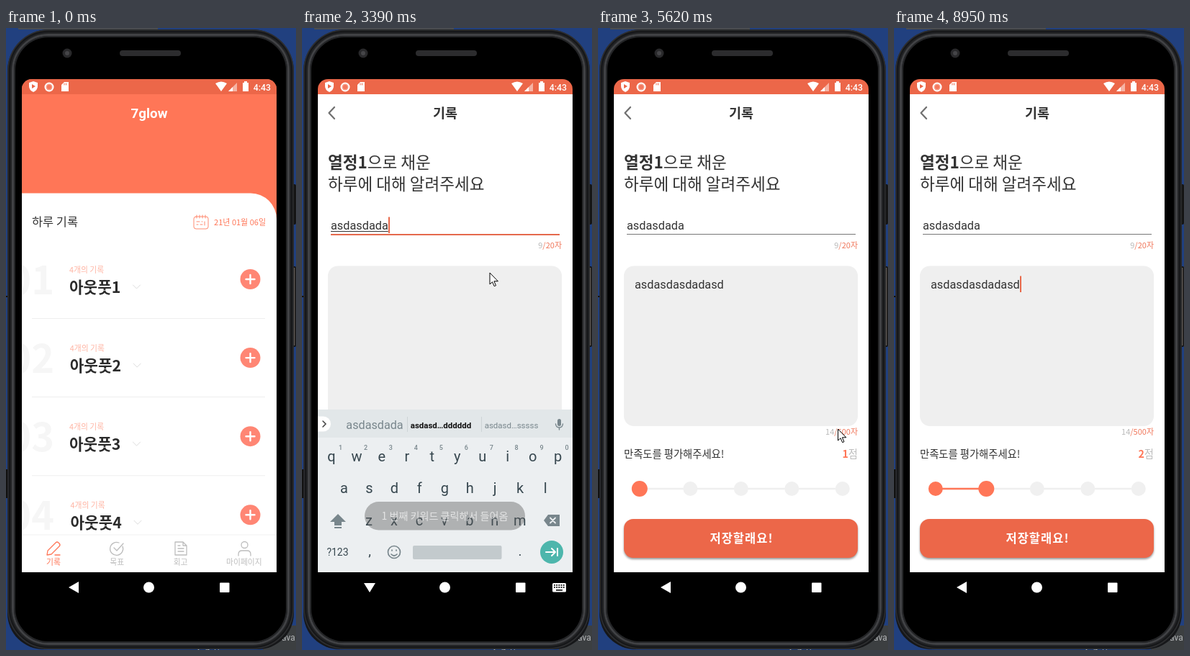
An HTML page with a canvas that plays this animation: 403x864 px, repeating every 9270 ms.

```html
<!DOCTYPE html>
<html lang="ko">
<head>
<meta charset="utf-8">
<title>하루 기록</title>
<style>
  html, body { margin: 0; width: 100%; height: 100%; overflow: hidden; background: #21407f; }
  canvas { display: block; }
</style>
</head>
<body>
<canvas id="stage" width="403" height="864"></canvas>
<script>
const LOOP = 9270;
const KR = '"Noto Sans CJK KR", "Noto Sans CJK", sans-serif', LATIN = 'Roboto, sans-serif';
const CORAL = '#ff7657', BRICK = '#ec6749', INK = '#333', PALE = '#efefef';
const SCREEN = { x: 22, y: 71, w: 354, h: 685 };
const stage = document.getElementById('stage').getContext('2d');
const pageLayer = new OffscreenCanvas(403, 864).getContext('2d');
let g = stage;

// drawing helpers
function text(s, x, y, size, color, weight = 400, align = 'left', font = KR) {
  g.font = `${weight} ${size}px ${font}`;
  g.textAlign = align;
  g.fillStyle = color;
  g.fillText(s, x, y);
  return g.measureText(s).width;
}
function rect(x, y, w, h, color, r = 0) {
  g.beginPath();
  g.roundRect(x, y, w, h, r);
  g.fillStyle = color;
  g.fill();
}
function disc(x, y, r, color) {
  g.beginPath();
  g.arc(x, y, r, 0, 7);
  g.fillStyle = color;
  g.fill();
}
function fill(d, color, x = 0, y = 0) {
  g.save(); g.translate(x, y);
  g.fillStyle = color;
  g.fill(new Path2D(d));
  g.restore();
}
function stroke(d, color, width = 1, x = 0, y = 0) {
  g.save(); g.translate(x, y);
  g.strokeStyle = color; g.lineWidth = width;
  g.lineCap = g.lineJoin = 'round';
  g.stroke(new Path2D(d));
  g.restore();
}
const clamp = v => Math.max(0, Math.min(1, v));
const ramp = (t, a, b) => clamp((t - a) / (b - a));
const easeOut = v => 1 - (1 - v) ** 3;
const typed = (s, t, start, step) => s.slice(0, Math.max(0, Math.floor((t - start) / step) + 1));

function drawPhone() {
  rect(0, 0, 403, 864, '#21407f');
  rect(17, 0, 194, 2, '#4b4d50');
  rect(357, 830, 46, 34, '#3c3f41');
  text('ava', 383, 851, 12, '#b4b6b8', 400, 'left', LATIN);
  text('출력 창', 262, 872, 12, '#b4b6b8');
  rect(396, 217, 7, 56, '#151515', 2);
  rect(396, 331, 7, 112, '#151515', 2);
  rect(400, 333, 1.5, 108, '#5c5651');
  rect(0, 372, 3, 2, '#111');
  rect(0, 613, 3, 40, '#111');
  rect(2, 2, 398, 861, '#161719', [58, 58, 50, 50]);
  for (const [inset, width, color] of [[1, 1.5, '#2e2f31'], [5, 2, '#222325'], [7.5, 3, '#414245'], [10, 2, '#242527']]) {
    g.beginPath();
    g.roundRect(2 + inset, 2 + inset, 398 - 2 * inset, 861 - 2 * inset, 57 - inset);
    g.strokeStyle = color; g.lineWidth = width;
    g.stroke();
  }
  rect(13, 13, 376, 839, '#000', 46);
  disc(85, 35, 6.5, '#29292b');
  disc(85, 35, 3, '#454548');
  rect(158, 31, 85, 8, '#2c2c2e', 4);
}

function drawStatusIcons() {
  fill('M0-7L6-5V0Q6 5 0 8Q-6 5-6 0V-5Z', '#fff', 38, 81);
  fill('M-2-3L3 0L-2 3Z', BRICK, 38, 81);
  disc(60, 82, 6.5, '#fff');
  disc(60, 82, 4.5, '#f6a08c');
  disc(60, 82, 3, '#f4785d');
  fill('M-5-2L-1-6H5V7H-5Z', '#fff', 82, 81);
  stroke('M-1-4V-2M1.5-4V-2', BRICK, 1, 82, 81);
  fill('M-8-4Q0-9 8-4L0 7Z', '#fff', 299, 81);
  fill('M-6 6L6-6V6Z', '#f6b3a4', 315, 82);
  fill('M-6 6L0 0V6Z', '#fff', 315, 82);
  fill('M-4-5H-2V-7H2V-5H4V7H-4Z', '#fff', 333, 81);
  text('4:43', 368, 86.5, 12.3, '#fff', 500, 'right', LATIN);
}

function drawTabs() {
  rect(22, 704, 354, 52, '#fff');
  rect(22, 703.5, 354, 1, '#f1f1f1');
  const gray = '#bdbdbd';
  stroke('M-9 9L-8 3L3-8Q5-10 7-8L8-7Q10-5 8-3L-3 8Z M2 9H9', CORAL, 1.3, 66, 723);
  stroke('M8-3A9 9 0 1 1 3-8M-4-1L0 3L9-7', gray, 1.3, 154, 723);
  stroke('M-8-9H3L8-4V9H-8ZM3-9V-4H8M-4-4H-1M-4 0H4M-4 4H4', gray, 1.3, 243, 723);
  stroke('M-4-5A4.5 4.5 0 1 0 5-5A4.5 4.5 0 1 0-4-5M-8 10V8Q-8 3-3 3H4Q9 3 9 8V10', gray, 1.3, 331, 723);
  ['기록', '목표', '회고', '마이페이지'].forEach((label, i) =>
    text(label, 66 + i * 88.3, 746, 10.8, i ? gray : CORAL, i ? 400 : 500, 'center'));
}

function drawHome() {
  rect(22, 71, 354, 685, CORAL);
  rect(22, 71, 354, 21, BRICK);
  text('7glow', 199, 125, 18.8, '#fff', 700, 'center', LATIN);
  rect(22, 229.5, 354, 526.5, '#fff', [0, 36, 0, 0]);
  text('하루 기록', 36, 275, 16.4, INK);
  stroke('M-7-8H7Q10-8 10-5V6Q10 9 7 9H-7Q-10 9-10 6V-5Q-10-8-7-8M-6-10V-6M-2-10V-6M2-10V-6M6-10V-6M-6-1H-2M1-1H2M5-1V4M-6 3H-4M-1 3H2', '#ff8a70', 1, 271, 270);
  text('21년 01월 06일', 361, 273.5, 11, CORAL, 400, 'right');
  [0, .7, 0, 1.5].forEach((dx, i) => {
    const y = 349 + i * 109.1;
    text('0' + (i + 1), 67, y + 20.5, 54, '#f6f6f6', 700, 'right');
    text('4개의 기록', 88 + dx, y - 9.5, 10.8, '#ffb4a3');
    text('아웃풋' + (i + 1), 88 + dx, y + 18.5, 21.3, '#2b2b2b', 700);
    stroke('M-5-2.5L0 2.5L5-2.5', '#dcdcdc', 1, 181.5 + dx, y + 10.5);
    disc(339.5, y, 14, '#ff8674');
    stroke('M-6 0H6M0-6V6', '#fff', 2.4, 339.5, y);
    rect(36, y + 54, 324, 1, '#eeeeee');
  });
  drawTabs();
}

function counter(n, limit, baseline) {
  const w = text(`/${limit}자`, 361, baseline, 11, '#f0775b', 400, 'right');
  text(n, 361 - w, baseline, 11, '#b9b9b9', 400, 'right');
}

function entry(s, x, baseline, caretOn, composing) {
  const w = s ? text(s, x, baseline, 16.3, INK, 400, 'left', LATIN) : 0;
  if (composing && s) rect(x, baseline + 2, w, 1, INK);
  if (caretOn) rect(x + w + (s ? .2 : 0), baseline - 17.5, 2, 22.5, '#e8694a');
}

function drawSlider(t) {
  const stops = [0, 1, 2, 3, 4].map(i => 57.8 + i * 70.5);
  const value = t < 7000 ? 0 : 1, y = 640;
  const press = ramp(t, 6600, 6720) * (1 - ramp(t, 7850, 7990));
  rect(stops[0], y - 1.3, 282, 2.6, PALE);
  rect(stops[0], y - 1.3, stops[value] - stops[0], 2.6, CORAL);
  stops.forEach((x, i) => disc(x, y, 10, i <= value ? CORAL : '#f0f0f0'));
  disc(stops[value], y, 11 + 10.5 * press, CORAL);
  if (press > 0) {
    g.save();
    g.translate(stops[value], 614);
    g.scale(press, press);
    fill('M0 0L-11.5-14A14.3 14.3 0 1 1 11.5-14Z', CORAL);
    text(value + 1, 0, -19, 12.5, '#fff', 400, 'center', LATIN);
    g.restore();
  }
}

function drawPage(t) {
  const onArea = t >= 3640, keyboardOpen = t < 4880;
  const title = typed('asdasdada', t, 2350, 100);
  const body = typed('asdasdasdadasd', t, 3800, 80);
  const blink = (t + 50) % 1000 < 500 && t > 4900;
  rect(22, 71, 354, 685, '#fff');
  rect(22, 71, 354, 21, BRICK);
  stroke('M45 110L37.5 118L45 126', '#707070', 2.2);
  text('기록', 199, 124.5, 18.5, INK, 700, 'center');
  const w = text('열정1', 36, 195, 22.55, INK, 700);
  text('으로 채운', 36 + w, 195, 22.55, INK);
  text('하루에 대해 알려주세요', 36, 225, 22.55, INK);

  if (!title) text('오늘 하루 무슨 일이 있었나요?', 40, 279.5, 16.4, '#adadad');
  rect(40, 286, 318, onArea ? 1 : 2, onArea ? '#777' : '#e5694c');
  entry(title, 40, 280, !onArea && (t > 2350 || (t - 1330) % 1000 < 500), !onArea);
  counter(title.length, 20, 306);

  rect(36, 330.5, 325, 222.5, PALE, 14);
  entry(body, 51, 362, onArea && (keyboardOpen || blink), keyboardOpen);
  counter(body.length, 500, 565);

  text('만족도를 평가해주세요!', 36, 597, 14.3, INK);
  const unit = text('점', 361, 597, 14.3, '#bdbdbd', 400, 'right');
  text(t < 7130 ? 1 : 2, 361 - unit, 597, 14.3, CORAL, 700, 'right');
  drawSlider(t);

  const ready = t >= 5200;
  g.save();
  if (ready) { g.shadowColor = 'rgba(0,0,0,.4)'; g.shadowBlur = 3; g.shadowOffsetY = 2; }
  rect(36, 682, 325, 54, ready ? BRICK : '#dedede', 13);
  g.restore();
  g.letterSpacing = '1px';
  text('저장할래요!', 199.5, 715, 16.5, '#fff', 700, 'center');
  g.letterSpacing = '0px';
}

function drawKeyboard(t) {
  const shown = easeOut(ramp(t, 2470, 2680)) * (1 - ramp(t, 4900, 5120) ** 2);
  if (!shown) return;
  const key = '#37474f', soft = '#78868c';
  g.save();
  g.translate(0, 226 * (1 - shown));
  rect(22, 530, 354, 226, '#eceff1');
  rect(22, 530, 354, 39, '#e2e7e9');
  rect(22, 539.5, 18, 21, '#fff', [0, 10.5, 10.5, 0]);
  stroke('M29 546L33 550L29 554', '#444', 1.6);
  const word = t < 3640 ? typed('asdasdada', t, 2350, 100) : typed('asdasdasdadasd', t, 3800, 80);
  text(word, 101, 557, word.length > 10 ? 11.5 : 16.2, soft, 400, 'center', LATIN);
  text('asdasd…dddddd', 193, 556, 11.5, '#111', 700, 'center', LATIN);
  text('asdasd…sssss', 291, 556, 11.5, soft, 400, 'center', LATIN);
  rect(146, 540, 1, 21, '#cdd3d6');
  rect(249, 540, 1, 21, '#cdd3d6');
  rect(355, 543, 5, 10, soft, 2.5);
  stroke('M352.5 550Q353 555 357.5 555Q362 555 362.5 550M357.5 555V558', soft, 1.4);

  [['qwertyuiop', 41, 602], ['asdfghjkl', 58.5, 646], ['zxcvbnm', 93, 691]].forEach(([row, x, y], r) =>
    [...row].forEach((c, i) => {
      text(c, x + i * 34.95, y, 20, key, 400, 'center', LATIN);
      if (!r) text((i + 1) % 10, x + 12.5 + i * 34.95, 586, 9, soft, 500, 'center', LATIN);
    }));
  fill('M0-10L11 1H5V6H-5V1H-11Z M-5 8H5V10H-5Z', soft, 50, 685);
  fill('M-11 0L-5-8H11V8H-5Z', soft, 347, 684);
  stroke('M-2-3L5 4M5-3L-2 4', '#eceff1', 1.8, 347, 683.5);
  text('?123', 49.5, 733, 14, key, 400, 'center', LATIN);
  text(',', 94, 733, 19, key, 400, 'center', LATIN);
  text('.', 303, 733, 19, key, 400, 'center', LATIN);
  stroke('M8.5 0A8.5 8.5 0 1 1-8.5 0A8.5 8.5 0 1 1 8.5 0M-4 3Q0 7 4 3M-3-3V-2M3-3V-2', soft, 1.7, 128, 728);
  rect(154, 719, 123.5, 19, '#c3cacd', 2);
  disc(347, 728, 16, '#4db6ac');
  stroke(t < 3640 ? 'M-8 0H5M0-5L5 0L0 5M8-5V5' : 'M8-5V0H-8M-4-4L-8 0L-4 4', '#fff', 2, 347, 728);
  g.restore();
}

function drawToast(t) {
  const alpha = t < 1330 ? 0 : (.17 + .83 * ramp(t, 1330, 1560)) * (1 - ramp(t, 3250, 3500));
  if (!alpha) return;
  g.globalAlpha = alpha;
  rect(87, 658, 223, 39.5, 'rgba(88,88,88,.94)', 19.7);
  g.globalAlpha = Math.sqrt(alpha);
  text('1 번째 키워드 클릭해서 들어옴', 198.5, 683, 14.1, '#fff', 400, 'center');
  g.globalAlpha = 1;
}

function drawSystemKeys(t) {
  const keyboardOpen = t >= 2350 && t < 4880;
  fill(keyboardOpen ? 'M-8-6H8L0 7Z' : 'M7-8V8L-7 0Z', '#fff', 94, 777);
  disc(198.5, 777, 7.5, '#fff');
  rect(297, 770.5, 13.5, 13.5, '#fff', 1);
  if (!keyboardOpen) return;
  rect(348, 771, 19, 12.5, '#fff', 1.5);
  for (let i = 0; i < 10; i++) rect(350 + i % 5 * 3.2, 773 + (i > 4) * 3, 1.8, 1.8, '#000');
  rect(353, 780, 9, 1.6, '#000');
}

// mouse path: time, x, y
const path = [
  [70, 258, 835], [160, 283, 818], [240, 271, 828], [340, 271, 828], [620, 371, 540], [860, 338, 353],
  [1500, 338, 353], [1960, 268, 297], [3270, 268, 297], [3560, 250, 400], [4000, 250, 400],
  [4180, 238, 640], [4340, 213, 769], [4500, 180, 800], [4740, 94, 778], [5180, 94, 778],
  [5620, 333, 557], [6140, 333, 557], [6500, 58, 641], [6740, 58, 641], [7450, 153, 633],
  [7840, 153, 633], [8080, 205, 675], [8480, 341, 820], [8600, 341, 820]
];
const presses = [[1030, 1090], [2040, 2120], [3600, 3680], [4820, 4900], [6580, 7690]];

function drawMouse(t) {
  const i = path.findIndex(p => p[0] > t);
  if (i < 1) return;
  const [a, b] = [path[i - 1], path[i]], k = ramp(t, a[0], b[0]);
  const x = a[1] + (b[1] - a[1]) * k, y = a[2] + (b[2] - a[2]) * k;
  if (presses.some(([from, to]) => t >= from && t < to)) disc(x, y, 12, 'rgba(255,255,60,.68)');
  const arrow = 'M.5.5V16L4 12.7L6.7 18.7L9 17.7L6.4 11.8H11.5Z';
  fill(arrow, '#fff', x, y);
  stroke(arrow, '#000', 1, x, y);
}

function draw(t) {
  const { x, y, w, h } = SCREEN;
  drawPhone();
  g.save();
  g.beginPath();
  g.roundRect(x, y, w, h + 24, [14, 14, 0, 0]);
  g.clip();
  if (t < 1600) drawHome();
  if (t >= 1330) {
    // the new page slides up over a slightly dimmed home screen
    rect(x, y, w, h, 'rgba(0,0,0,.08)');
    g = pageLayer;
    drawPage(t);
    g = stage;
    g.globalAlpha = clamp(.8 + (t - 1330) / 400);
    const slide = t < 1600 ? 20 * Math.exp((1330 - t) / 66) : 0;
    g.drawImage(pageLayer.canvas, x, y, w, h, x, y + slide, w, h);
    g.globalAlpha = 1;
  }
  drawStatusIcons();
  g.restore();
  g.save();
  g.beginPath();
  g.rect(x, y, w, h);
  g.clip();
  drawKeyboard(t);
  drawToast(t);
  g.restore();
  drawSystemKeys(t);
  drawMouse(t);
}

const start = performance.now();
function tick() {
  draw((performance.now() - start) % LOOP);
  requestAnimationFrame(tick);
}
tick();
</script>
</body>
</html>
```
